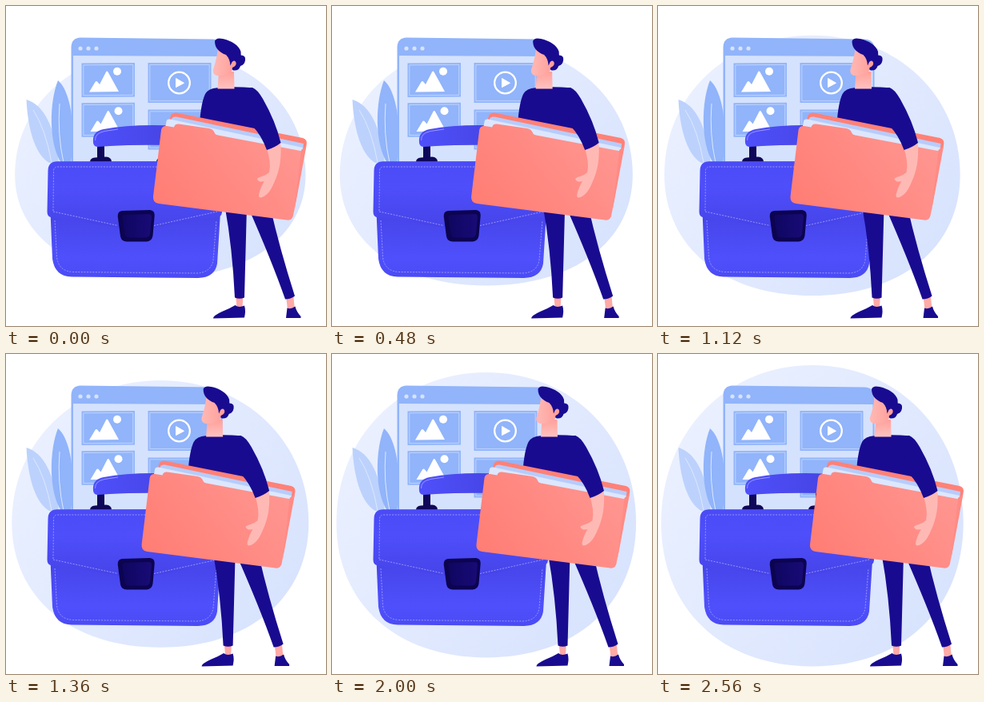
An HTML page that plays this animation: 400x400 px, repeating every 2600 ms.

```html
<!DOCTYPE html>
<html lang="en">
<head>
<meta charset="utf-8">
<title>Man with folder and briefcase</title>
<style>
  html, body { margin: 0; height: 100%; overflow: hidden; background: #fff; }
  svg { display: block; width: 100vw; height: 100vh; }
  .sky { fill: #91b4fa; }
  .pale { fill: #d5e2fd; }
  .navy { fill: #190b90; }
  .dark { fill: #0f0759; }
  .stitch { fill: none; stroke: #aaa8ff; stroke-width: .8; stroke-dasharray: 2 1.6; }
  .frame { fill: none; stroke: #cadcfe; stroke-width: .8; }
  .vein { fill: none; stroke: #dce8ff; stroke-width: 1; }
</style>
</head>
<body>
<svg viewBox="0 0 400 400">
  <defs>
    <linearGradient id="disc" x1="0" y1="0" x2="1" y2=".7">
      <stop stop-color="#edf2ff"/><stop offset="1" stop-color="#d8e3fd"/>
    </linearGradient>
    <linearGradient id="flap" x1="0" y1="0" x2="0" y2="1">
      <stop stop-color="#4b4bf6"/><stop offset=".4" stop-color="#4e4efb"/><stop offset="1" stop-color="#4644e8"/>
    </linearGradient>
    <linearGradient id="case" x1="0" y1="0" x2="0" y2="1">
      <stop stop-color="#4644e8"/><stop offset=".7" stop-color="#4f50fc"/><stop offset="1" stop-color="#4b4bf4"/>
    </linearGradient>
    <linearGradient id="grip" x1="0" y1="0" x2="1" y2="0">
      <stop stop-color="#4f50fb"/><stop offset="1" stop-color="#4543e2"/>
    </linearGradient>
    <linearGradient id="folder" x1="0" y1=".8" x2="1" y2=".3">
      <stop stop-color="#ff7d74"/><stop offset="1" stop-color="#ff9691"/>
    </linearGradient>
    <linearGradient id="neck" x1="0" y1="0" x2="0" y2="1">
      <stop stop-color="#ffa09b"/><stop offset="1" stop-color="#ffc3bf"/>
    </linearGradient>
    <linearGradient id="face" x1="0" y1="0" x2="1" y2="0">
      <stop stop-color="#ffb9b5"/><stop offset="1" stop-color="#ff9d97"/>
    </linearGradient>
    <linearGradient id="lock" x1="0" y1="0" x2="1" y2="0">
      <stop stop-color="#0f0660"/><stop offset="1" stop-color="#180b76"/>
    </linearGradient>
    <g id="card">
      <path class="sky" d="M94.5 71.5 161 71V113.5L94.5 114Z"/>
      <path class="frame" d="M96.8 73.8 158.800 73.3V111.3L96.800 111.8Z"/>
    </g>
    <g id="photo" fill="#fff">
      <path d="M104 107.5 111.5 95Q113 93 114.5 95L117 98 125 82.5Q126.3 80.5 127.8 83L141 107Z"/>
      <circle cx="139" cy="81.7" r="5"/>
    </g>
    <g id="video">
      <path class="sky" d="M177.5 71H256.5V121H177.5Z"/>
      <path class="frame" d="M179.8 73.3H254.2V118.7H179.8Z"/>
    </g>
    <g id="post" class="dark">
      <path d="M114 174H123V191H114Z"/>
      <path d="M105 195Q105 190 111 189.5L125 188.5Q132 189 132 195Z"/>
    </g>
  </defs>

  <path id="blob" fill="url(#disc)"/>

  <path fill="#bcd2fc" d="M25.5 117C48 124 60 150 66 196H54C35 185 27 150 25.5 117Z"/>
  <path class="vein" d="M34 130Q50 155 57 196"/>
  <path class="sky" d="M65 93C80 105 88 150 81 196H69C53 172 54 120 65 93Z"/>
  <path class="vein" d="M67 122Q64 160 72 196"/>

  <path class="sky" d="M81.5 198V51Q82 40 93 39.5L258 41.5Q270.5 42 270.5 54V198Z"/>
  <path class="pale" d="M84 62 268.5 63V198H84Z"/>
  <g class="pale"><circle cx="93" cy="53" r="2.6"/><circle cx="103" cy="53" r="2.6"/><circle cx="113" cy="53" r="2.6"/></g>
  <use href="#card"/>
  <use href="#photo"/>
  <use href="#card" y="49.7"/>
  <use href="#photo" x="1.5" y="49.5"/>
  <use href="#video"/>
  <use href="#video" y="58.5"/>
  <circle cx="216.5" cy="96" r="13.3" fill="none" stroke="#fff" stroke-width="2.3"/>
  <path fill="#fff" stroke="#fff" stroke-linejoin="round" d="M212.5 90.5V101.5L222.5 96.3Z"/>

  <use href="#post"/>
  <use href="#post" x="83"/>
  <path fill="url(#grip)" d="M109 171C108 160 113 156 122 154Q160 147 215 150V174Q160 173 130 175L115 176Q109.5 176 109 171Z"/>
  <path fill="none" stroke="#a09fff" stroke-width=".9" d="M111.5 168Q111 159 123 156.5L140 154"/>

  <path fill="url(#case)" d="M55.5 258 58 316Q61 338 82 338.5L240 340Q261 339.5 264 322L268 258Z"/>
  <path class="stitch" d="M61 268 63.500 314Q65.500 331.500 84 332.500L238 334Q256 333.500 259 318L263 268"/>
  <path fill="url(#flap)" d="M52.500 206Q52.500 194.500 64 194.300L257 194Q268 194.500 268.300 206L270 258Q269.500 264 262 264L186 277H140L56 264Q51.500 263 51.500 257Z"/>
  <path class="stitch" d="M59 256 59.500 206Q59.500 201 65 201H256Q262 201 262.300 207L264.500 257M59 257 140 274.500M185 274.500 264 257"/>
  <path fill="#0c0450" d="M145 256 180 255Q186 255.500 185.700 262L183.500 287Q182.500 294 176 294.500H151Q144 294 143 288L139.700 263Q139.500 256.500 145 256Z"/>
  <path fill="url(#lock)" d="M149 261 179 260Q182 260.500 182 264L180 285Q179 289 175 289.500H153Q149 289 148.500 285L145.500 264Q145.500 261 149 261Z"/>

  <g id="man">
    <g fill="#ffaaa5">
      <path d="M287 360H296.500L295.500 377H288.500Z"/>
      <path d="M350 362 359 359 361 380H352Z"/>
    </g>
    <g class="navy">
      <path d="M273.500 250H301L298 364.500Q292 367 286 364.500Q283 302 273.500 250Z"/>
      <path d="M302 250H330Q342 303 361 362.500Q356 366.500 349 366.500Q332 318 302 250Z"/>
      <path d="M259 390.500Q259 387 270 382Q280 378 286.500 374Q291 377.500 298 374.500Q300 381 298 389.500Z"/>
      <path d="M350 390 351.500 377.500Q356 379.500 361.500 375.500Q363 382 368.500 388V390Z"/>
      <path d="M241 160Q243 122 249 110Q253 103 264 102.300Q286 100 308 102.300L330 165V200H241Z"/>
    </g>

    <path fill="url(#neck)" d="M266 82H285L285.500 103.500H264.500Z"/>
    <path fill="url(#face)" d="M265 52Q264 64 258.800 80Q258.500 86 264 87Q278 88 284 79Q289 75 288 68L284 55Z"/>
    <path class="navy" d="M261 44Q262.500 39 271 41C282 43.500 291 49 293.500 57L293.700 61.500Q300 61.500 299 68Q298 73.500 293 75Q291.500 81 284.500 80.500Q282 80 283 77Q288.500 74.500 287.500 70.500Q286 67 282.500 70L280.500 74.500Q280 66 275 61Q261 56 261 44Z"/>

    <path fill="#ff8177" d="M200 155 206 137Q208 133 213 133.500L371 165Q377 167 375.700 173L371 194Z"/>
    <path fill="#b7ccfb" d="M203 158 207 141Q208 138 213 138.500L372 172 370 190Z"/>
    <path fill="#dce7ff" d="M198 158 200.500 144Q201 141 205 141.500L371 177 369 192Z"/>
    <path fill="url(#folder)" d="M194 155Q195 149.500 201 150L210 151.500Q211 147 216 147.500L254 153Q259 154 260.500 158Q261.500 161 265 161.500L368 181Q373.500 182 372.500 187L359 262Q357.500 268.500 351 267.500L191 247Q183 245.500 184 238Z"/>
    <path fill="#ff8b84" d="M369 180 375.500 175 360 258Z"/>
    <path fill="#ffb9b5" d="M325 175 343 169Q346 198 335 221Q328 238 318 239.500Q315 239 316.500 234Q319 225 323 219Q316 221 314 216.500Q314 214.500 320 213Q326 211 329 208Q332 196 325 175Z"/>
    <path class="navy" d="M295 102H308Q314 104 321 116Q337 144 343.500 171Q336 177 326 180Q319 161 308 150Z"/>
  </g>
</svg>
<script>
  const LOOP = 2600, STEP = 40, TURN = 1000;
  const blob = document.getElementById('blob');
  const man = document.getElementById('man');

  // An egg-like disc: two half ovals that meet at the widest line.
  function disc(cx, waist, rx, top, bottom) {
    const half = (edge, side, k) => {
      const h = edge - waist;
      return `C${cx - side * rx} ${waist + k * h} ${cx - side * k * rx} ${edge} ${cx} ${edge}` +
        `S${cx + side * rx} ${waist + k * h} ${cx + side * rx} ${waist}`;
    };
    return `M${cx - rx} ${waist}` + half(top, 1, .572) + half(bottom, -1, .6) + 'Z';
  }

  function draw(now) {
    const t = Math.floor(now % LOOP / STEP) * STEP;
    // The man drifts left, then back right; the disc keeps growing.
    const x = t < TURN ? -.0205 * t : -.0205 * TURN + .017 * (t - TURN);
    man.setAttribute('transform', `translate(${x})`);
    blob.setAttribute('d', disc(192.8, 211, 181.7 + .0028 * t, 54.5 - .0158 * t, 340 + .0197 * t));
  }

  const start = performance.now();
  function tick() {
    draw(performance.now() - start);
    requestAnimationFrame(tick);
  }
  tick();
</script>
</body>
</html>
```
